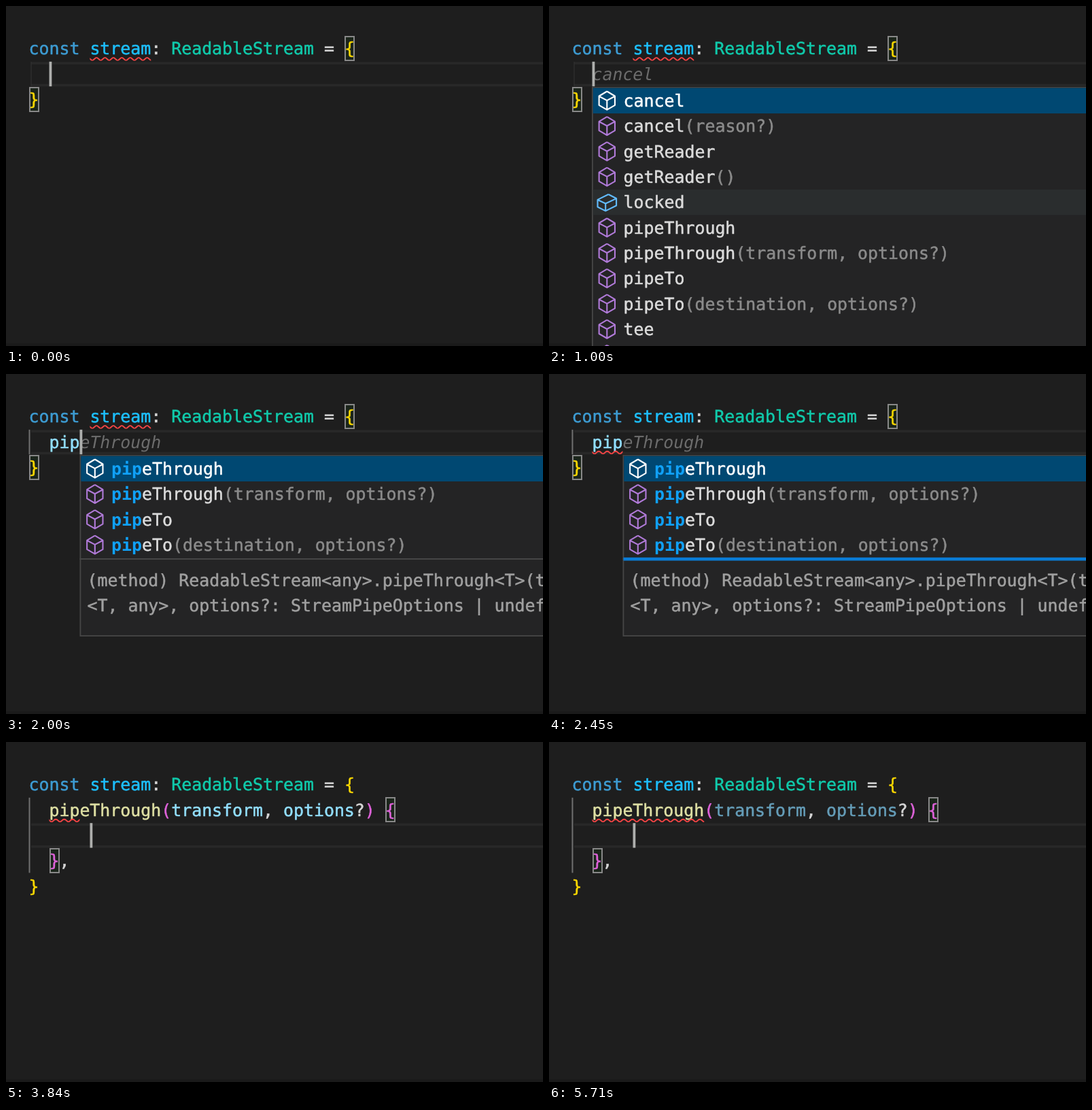
An HTML page with a canvas that plays this animation: 790x500 px, repeating every 5.96 s.

```html
<!DOCTYPE html>
<html lang="en">
<head>
<meta charset="utf-8">
<title>Editor completion</title>
<style>
  html, body { margin: 0; width: 100%; height: 100%; overflow: hidden; background: #1e1e1e; }
  canvas { display: block; width: 790px; height: 500px; }
</style>
</head>
<body>
<canvas id="stage" width="790" height="500"></canvas>
<script>
const ctx = document.getElementById('stage').getContext('2d');
const W = 790, H = 500, LOOP = 5960;
const SIZE = 24.88, PITCH = 14.98, ROW = 37.35;
const LEFT = 33.5, TOP = 44, BASE = 27.2;
const FAMILY = '"DejaVu Sans Mono", "Liberation Mono", monospace';

const C = {
  bg: '#1e1e1e', plain: '#d6d6d6', keyword: '#3d9cd3', constant: '#1dc0ff',
  type: '#10caab', gold: '#fbd800', pink: '#de62d9', method: '#dfe0a4',
  param: '#92dffe', faded: '#659db8', ghost: '#6c6c6c', error: '#f04444',
  caret: '#aeafad', bracket: '#888888', popup: '#242425', border: '#464646',
  selected: '#004872', hover: '#2a2d2e', match: '#10a1f8', detail: '#8b8b8b',
  selectedDetail: '#9cb6c8', doc: '#a0a0a0', comment: '#57a04c', sash: '#0a7cd6',
  cube: '#b07ad8', field: '#62bcff', snippet: '#c5c5c5'
};

const colX = col => LEFT + col * PITCH;
const lineY = line => TOP + line * ROW;

function box(x, y, w, h, color) {
  ctx.fillStyle = color;
  ctx.fillRect(x, y, w, h);
}

// a hairline stroke gives the heavier look of smoothed screen type
function text(str, x, top, color, style = '') {
  ctx.font = `${style} ${SIZE}px ${FAMILY}`;
  ctx.fillStyle = ctx.strokeStyle = color;
  ctx.fillText(str, x, top + BASE);
  if (style) return;
  ctx.lineWidth = .5;
  ctx.strokeText(str, x, top + BASE);
}

// parts: alternating string and colour
function code(line, col, parts, style) {
  for (let i = 0; i < parts.length; i += 2) {
    text(parts[i], colX(col), lineY(line), parts[i + 1], style);
    col += parts[i].length;
  }
}

function path(points) {
  points.forEach(([x, y], i) => i ? ctx.lineTo(x, y) : ctx.moveTo(x, y));
}

function bracketBox(line, col) {
  const x = Math.round(colX(col) + .2), y = Math.round(lineY(line));
  box(x, y, 14, 37, 'rgba(0,100,0,.1)');
  ctx.strokeStyle = C.bracket;
  ctx.lineWidth = 2;
  ctx.strokeRect(x + 1, y + 1, 13, 35);
}

function squiggle(line, col, count) {
  const x = colX(col), w = count * PITCH, half = 6.2;
  const bottom = lineY(line + 1) - .8, top = bottom - 5.2;
  ctx.save();
  ctx.beginPath();
  ctx.rect(x, top, w, bottom - top);
  ctx.clip();
  ctx.beginPath();
  for (let i = 0, px = x - 2.6; px < x + w + 9; i++, px += half) {
    ctx.lineTo(px, i % 2 ? bottom : top);
  }
  ctx.strokeStyle = C.error;
  ctx.lineWidth = 2;
  ctx.stroke();
  ctx.restore();
}

function lineHighlight(line) {
  box(37, lineY(line) + 1, W, 3.5, '#282828');
  box(37, lineY(line + 1) - 4, W, 3.5, '#282828');
}

const icons = {
  cube() {
    path([[8, 1.5], [13.5, 4.8], [13.5, 11.1], [8, 14.3], [2.5, 11.1], [2.5, 4.8], [8, 1.5]]);
    path([[2.5, 4.9], [8, 7.8], [13.5, 4.9]]);
    path([[8, 7.8], [8, 14.3]]);
  },
  field() {
    path([[9, 2.5], [14.5, 5.3], [14.5, 10.3], [7, 14], [1.5, 11.2], [1.5, 6.2], [9, 2.5]]);
    path([[1.5, 6.3], [7, 8.9], [14.5, 5.4]]);
    path([[7, 8.9], [7, 14]]);
  },
  snippet() {
    path([[2.2, 13], [2.2, 1.5], [14, 1.5], [14, 13]]);
    for (let x = 1.7; x < 14.5; x += 1.72) path([[x, 14.5], [x + .9, 14.5]]);
  }
};

function icon(name, cx, cy, color) {
  ctx.save();
  ctx.translate(cx, cy);
  ctx.scale(2.12, 2.12);
  ctx.translate(-8, -8);
  ctx.lineWidth = 1;
  ctx.lineJoin = 'round';
  ctx.strokeStyle = color;
  ctx.beginPath();
  icons[name]();
  ctx.stroke();
  ctx.restore();
}

const item = (label, args = '', kind = 'cube') => ({ label, args, kind });
const through = [item('pipeThrough'), item('pipeThrough', '(transform, options?)')];
const to = [item('pipeTo'), item('pipeTo', '(destination, options?)')];
const pipes = [...through, ...to];
const publicMethod = item('public method', '', 'snippet');
const allItems = [
  item('cancel'), item('cancel', '(reason?)'),
  item('getReader'), item('getReader', '()'),
  item('locked', '', 'field'), ...pipes, item('tee'), item('tee', '()')
];
const pItems = [publicMethod, ...pipes, item('prop', '', 'snippet')];
const piItems = [...pipes, publicMethod];

const pipeDoc = {
  gap: 12.5, pitch: ROW,
  lines: [
    ['(method) ReadableStream<any>.pipeThrough<T>(tr', C.doc],
    ['<T, any>, options?: StreamPipeOptions | undefi', C.doc]
  ]
};
const snippetDoc = {
  gap: 9.5, pitch: 36,
  lines: [
    ['Public Method Definition (TypeScript Language Ba', C.doc],
    ['', C.doc],
    ['/**', C.comment],
    [' * name', C.comment]
  ]
};

// typed letters are marked where they occur, in order
function label(str, query, x, top, color) {
  let start = 0;
  for (const ch of query) {
    const at = str.indexOf(ch, start);
    text(str.slice(start, at), x + start * PITCH, top, color);
    text(ch, x + at * PITCH, top, C.match, 'bold');
    start = at + 1;
  }
  text(str.slice(start), x + start * PITCH, top, color);
}

function popup({ left, items, query = '', active = 0, hover = -1, doc, docTop, bottom = H + 9 }) {
  const first = 120.6;
  box(left, 119, W, bottom - 119, C.border);
  box(left + 1.8, first, W, bottom - first - 1.8, C.popup);
  items.forEach((it, i) => {
    const y = first + i * ROW, on = i === active;
    if (on || i === hover) box(left + 1.8, y, W, ROW, on ? C.selected : C.hover);
    icon(it.kind, left + 22.3, y + ROW / 2, on ? '#fff' : C[it.kind]);
    const x = left + 46.6;
    label(it.label, query, x, y, on ? '#fff' : '#dcdcdc');
    text(it.args, x + it.label.length * PITCH, y, on ? C.selectedDetail : C.detail);
  });
  if (!doc) return;
  box(left, docTop - 1, W, 2, C.border);
  doc.lines.forEach(([str, color], i) => text(str, left + 11, docTop + doc.gap + i * doc.pitch, color));
}

const caretOff = [[160, 660], [1150, 1660], [2450, 2850], [3420, 3840], [4310, 4810], [5320, 5710]];

function caret(t, line, col) {
  if (caretOff.some(([a, b]) => t >= a && t < b)) return;
  box(colX(col) + .1, lineY(line) + .5, 3.8, ROW - 1, C.caret);
}

function header() {
  code(0, 0, ['const ', C.keyword, 'stream', C.constant, ': ', C.plain,
    'ReadableStream', C.type, ' = ', C.plain, '{', C.gold]);
}

function typing(t) {
  const typed = t < 1660 ? '' : t < 1890 ? 'p' : t < 2000 ? 'pi' : 'pip';
  const multiline = t >= 2940, checked = t >= 2375;
  const end = multiline ? 4 : 2, col = 2 + typed.length;

  lineHighlight(1);
  if (typed) box(33.5, lineY(1) + .5, 2, ROW - 1, '#707070');
  else box(36.5, lineY(1) + .5, 1, ROW - 1, '#343434');
  bracketBox(0, 31);
  bracketBox(end, 0);
  header();
  code(end, 0, ['}', C.gold]);
  code(1, 2, [typed, C.param]);
  if (checked) squiggle(1, 2, 3);
  else squiggle(0, 6, 6);

  if (multiline) {
    code(1, col, ['eThrough(transform, options?) {', C.ghost], 'italic');
    code(3, 2, ['},', C.ghost], 'italic');
  } else if (typed.length > 1) {
    code(1, col, ['pipeThrough'.slice(typed.length), C.ghost], 'italic');
  } else if (!typed && t >= 1000) {
    code(1, col, ['cancel', C.ghost], 'italic');
  }

  if (t >= 1000) suggest(t, typed);
  caret(t, 1, col);
}

function suggest(t, query) {
  if (!query) popup({ left: 63, items: allItems, hover: 4 });
  else if (query === 'p') popup({ left: 79.8, items: pItems, query, hover: 4, doc: snippetDoc, docTop: 350 });
  else if (query === 'pi') popup({ left: 94, items: piItems, query, hover: 4, doc: pipeDoc, docTop: 309.5, bottom: 423 });
  else {
    popup({ left: 108.5, items: pipes, query, active: t < 2850 ? 0 : 1, doc: pipeDoc, docTop: 272, bottom: 386 });
    if (t < 2300) return;
    ctx.globalAlpha = t < 2375 ? .4 : t < 2450 ? .8 : 1;
    box(109.5, 269.8, W, 4.7, C.sash);
    ctx.globalAlpha = 1;
  }
}

function accepted(t) {
  const checked = t >= 4090, arg = checked ? C.faded : C.param;
  lineHighlight(2);
  box(33.5, lineY(1) + .5, 2, ROW * 3 - 1.5, '#707070');
  bracketBox(1, 35);
  bracketBox(3, 2);
  header();
  code(1, 2, ['pipeThrough', C.method, '(', C.pink, 'transform', arg, ', ', C.plain,
    'options', arg, '?', C.plain, ')', C.pink, ' {', C.pink]);
  code(3, 2, ['}', C.pink, ',', C.plain]);
  code(4, 0, ['}', C.gold]);
  squiggle(1, 2, checked ? 11 : 3);
  caret(t, 2, 6);
}

function draw(now) {
  const t = now % LOOP;
  box(0, 0, W, H, C.bg);
  box(0, 496, W, 4, '#1a1a1a');
  if (t < 3840) typing(t);
  else accepted(t);
}

ctx.textRendering = 'geometricPrecision';
ctx.textBaseline = 'alphabetic';
const begin = performance.now();
function tick() {
  draw(performance.now() - begin);
  requestAnimationFrame(tick);
}
tick();
</script>
</body>
</html>
```
